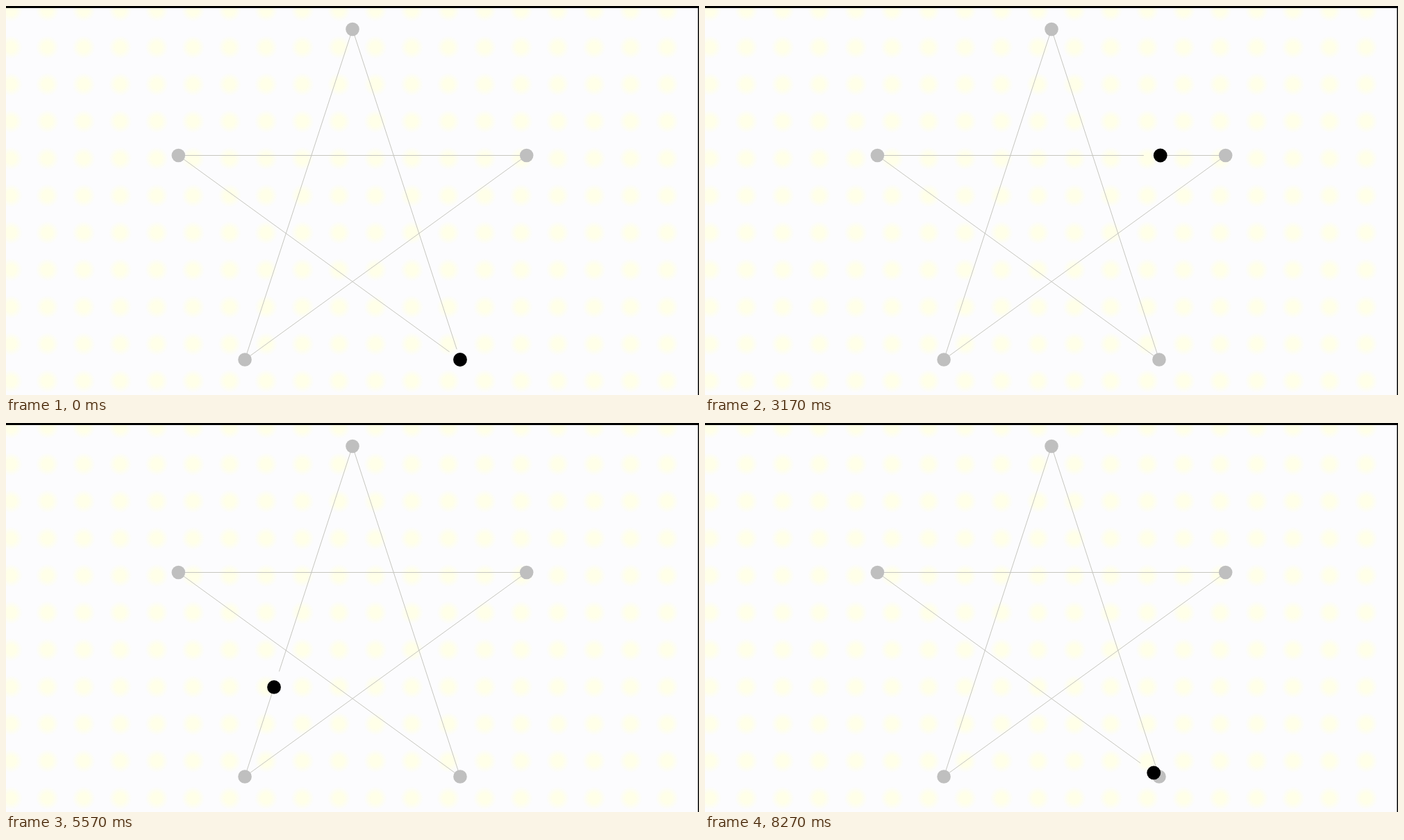
These frames come from a looping animation (998 px wide and 561 px high, 8.31 s). An HTML page with a canvas:

```html
<!DOCTYPE html>
<html lang="en">
<head>
<meta charset="utf-8">
<title>Walk on a pentagram</title>
<style>
html, body { margin: 0; width: 100%; height: 100%; overflow: hidden; background: #fcfcfe; }
canvas { display: block; }
</style>
</head>
<body>
<canvas id="stage" width="998" height="561"></canvas>
<script>
const W = 998, H = 561, LOOP = 8310;
const FRAME = 100 / 3, TICK = 50 / 3, STRIDE = 14.05;
const RADIUS = 9.8;

const nodes = {
  top: [499, 33.5],
  left: [248.3, 215.5],
  right: [749.7, 215.5],
  lowLeft: [344, 510],
  lowRight: [654, 510]
};

// The star is walked one way round from the top, then back again.
const route = ['lowRight', 'top', 'lowRight', 'left', 'right', 'lowLeft',
  'top', 'lowLeft', 'right', 'left', 'lowRight'].map(name => nodes[name]);
const departures = [150, 978, 1855, 2673, 3492, 4310, 5128, 5905, 6792, 7678];

const ctx = document.getElementById('stage').getContext('2d');
const backdrop = makeBackdrop();

function makeBackdrop() {
  const canvas = document.createElement('canvas');
  canvas.width = W;
  canvas.height = H;
  const c = canvas.getContext('2d');
  c.fillStyle = '#fcfcfe';
  c.fillRect(0, 0, W, H);
  for (let row = 0; row < 11; row++) {
    for (let col = 0; col < 19; col++) {
      const x = 7 + col * 52.5, y = 6 + row * 53.5;
      const glow = c.createRadialGradient(x, y, 7, x, y, 17);
      glow.addColorStop(0, 'rgba(255,255,232,1)');
      glow.addColorStop(1, 'rgba(255,255,232,0)');
      c.fillStyle = glow;
      c.fillRect(x - 17, y - 17, 34, 34);
    }
  }
  c.fillStyle = '#000';
  c.fillRect(0, 0, W, 3);
  c.fillRect(996.5, 0, 1.5, H);
  return canvas;
}

function circle([x, y], r) {
  ctx.beginPath();
  ctx.arc(x, y, r, 0, Math.PI * 2);
}

function disc(point, r, color) {
  circle(point, r);
  ctx.fillStyle = color;
  ctx.fill();
}

function along([ax, ay], [bx, by], distance) {
  const length = Math.hypot(bx - ax, by - ay);
  const u = Math.min(1, Math.max(0, distance / length));
  return [ax + (bx - ax) * u, ay + (by - ay) * u];
}

// Position of the walker now and one stride earlier.
function walker(t) {
  let leg = departures.length - 1;
  let ticks = 36;
  if (t >= departures[0]) {
    while (departures[leg] > t) leg--;
    ticks = Math.min(36, Math.floor((t - departures[leg]) / TICK));
  }
  const from = route[leg], to = route[leg + 1];
  return {
    now: along(from, to, ticks * STRIDE),
    before: along(from, to, (ticks - 1) * STRIDE)
  };
}

function drawStar() {
  ctx.lineWidth = 1;
  ctx.strokeStyle = '#c6c6c0';
  ctx.beginPath();
  route.slice(1, 7).forEach(([x, y], i) => i ? ctx.lineTo(x, y) : ctx.moveTo(x, y));
  ctx.stroke();
}

function erase(point) {
  ctx.save();
  circle(point, RADIUS);
  ctx.clip();
  ctx.drawImage(backdrop, 0, 0);
  ctx.restore();
}

function render(ms) {
  const t = Math.floor((ms % LOOP + 3.4) / FRAME) * FRAME;
  const { now, before } = walker(t);
  ctx.drawImage(backdrop, 0, 0);
  drawStar();
  erase(before);
  Object.values(nodes).forEach(p => disc(p, RADIUS, '#bfbfbf'));
  disc(now, RADIUS + 0.1, '#000');
}

let start;
function loop() {
  const time = performance.now();
  if (start === undefined) start = time;
  render(time - start);
  requestAnimationFrame(loop);
}
loop();
</script>
</body>
</html>
```
